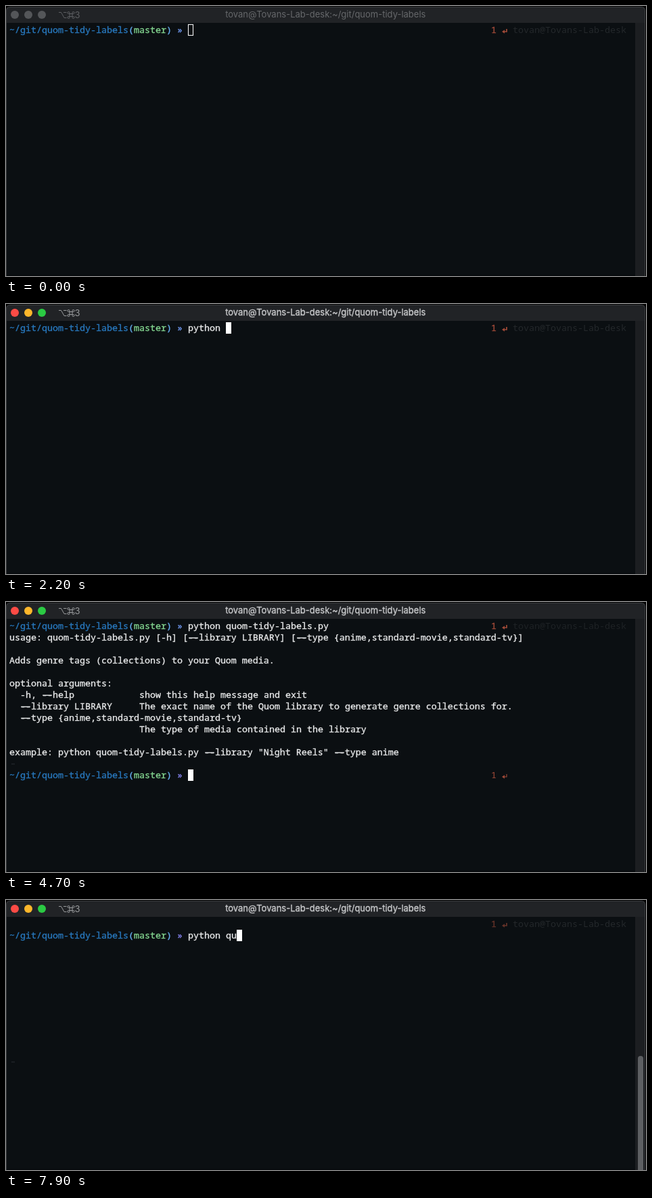
Recreate the animation shown at these times as an HTML page. Size 946x400 px, loop 8000 ms.

```html
<!DOCTYPE html>
<html lang="en">
<head>
<meta charset="utf-8">
<title>Terminal session</title>
<style>
  html, body { margin: 0; width: 100%; height: 100%; overflow: hidden; background: #000; }
  svg { display: block; width: 946px; height: 400px; }
  text { white-space: pre; }
  .mono { font: 400 13.3333px "Noto Sans Mono", "DejaVu Sans Mono", monospace; font-variant-ligatures: none; }
  .medium { stroke-width: 0.35px; }
  .ui { font: 400 13px Inter, "Open Sans", sans-serif; }
</style>
</head>
<body>
<svg id="stage" viewBox="0 0 946 400" xmlns="http://www.w3.org/2000/svg"></svg>
<script>
const LOOP = 8000, CELL = 8, LINE = 17, LEFT = 5;
const HOST = 'tovan@Tovans-Lab-desk', REPO = 'quom-tidy-labels', SCRIPT = REPO + '.py';
const WHITE = '#e8e9ea', DIM = '#24282b', RED = '#a04a38';
const PROMPT_COLS = 33;
const stage = document.getElementById('stage');

function add(parent, tag, attrs, content) {
  const el = document.createElementNS('http://www.w3.org/2000/svg', tag);
  for (const key in attrs) el.setAttribute(key, attrs[key]);
  if (content !== undefined) el.textContent = content;
  parent.appendChild(el);
  return el;
}
const group = (parent = stage) => add(parent, 'g', {});
const rect = (parent, x, y, width, height, fill, rx = 0) =>
  add(parent, 'rect', { x, y, width, height, fill, rx });
const colX = col => LEFT + col * CELL;
const write = (parent, col, row, content, fill = WHITE, medium = true) =>
  add(parent, 'text', {
    x: colX(col), y: 40 + row * LINE, fill,
    class: medium ? 'mono medium' : 'mono', stroke: medium ? fill : 'none'
  }, content);
const show = (el, on) => el.setAttribute('visibility', on ? 'visible' : 'hidden');

// Window
rect(stage, 0, 0, 946, 400, '#000');
add(stage, 'path', { d: 'M0 400V7Q0 1 6 1H939Q945 1 945 7V400Z', fill: '#3a3c3f' });
add(stage, 'path', { d: 'M1 25V7Q1 2 6.5 2H938.5Q944 2 944 7V25Z', fill: '#212326' });
rect(stage, 1, 25, 929, 375, '#0b0f12');
rect(stage, 930, 25, 14, 375, '#1c1e21');
rect(stage, 1, 398.5, 929, 1.5, '#070a0c');
const thumb = rect(stage, 934, 231, 8, 180, '#5d5f62', 4);

const lights = [13, 33, 53].map(cx => add(stage, 'circle', { cx, cy: 13, r: 6 }));
const badge = group();
add(badge, 'path', {
  d: 'M78 9.5H81.5L86 17.5H89.5M85 9.5H89.5' +
     'M94 11.5H98V15.5H94ZM94 11.5H92.5A1.5 1.5 0 1 1 94 10ZM98 11.5V10A1.5 1.5 0 1 1 99.5 11.5Z' +
     'M98 15.5H99.5A1.5 1.5 0 1 1 98 17ZM94 15.5V17A1.5 1.5 0 1 1 92.5 15.5Z',
  fill: 'none', stroke: 'currentColor', 'stroke-width': 1
});
add(badge, 'text', { x: 101.5, y: 17.5, class: 'ui', fill: 'currentColor' }, '3');
const title = add(stage, 'text', { x: 472.3, y: 17.3, class: 'ui medium', 'text-anchor': 'middle' });

// Terminal lines
function prompt(row) {
  const g = group();
  const parts = [[0, '~/git/' + REPO, '#2878bd'], [22, '(', '#66adf0'], [23, 'master', '#83d590'],
                 [29, ')', '#66adf0'], [31, '»', row ? '#8583ee' : '#6f97ee']];
  for (const [col, s, fill] of parts) write(g, col, row, s, fill);
  g.command = write(g, PROMPT_COLS, row, '');
  return g;
}
function exitMark(row) {
  const g = group(), y = row * LINE;
  write(g, 89, row, '1', RED, !row);
  add(g, 'path', {
    d: `M740 ${y + 34}V${y + 38}H735`, fill: 'none', stroke: RED, 'stroke-width': row ? 1.1 : 1.7
  });
  add(g, 'path', { d: `M733 ${y + 38}l4 -2.8v5.6Z`, fill: RED });
  return g;
}

// Plain output, with double hyphens joined into one bar
function writeJoined(parent, col, row, content) {
  write(parent, col, row, content);
  for (const { index } of content.matchAll(/--/g))
    rect(parent, colX(col + index) + 1.2, 35.5 + row * LINE, 13.6, 1.4, WHITE);
}

const first = prompt(0), second = prompt(13), third = prompt(1);
const firstMark = exitMark(0), secondMark = exitMark(13);
const host = write(stage, 93, 0, HOST, DIM, false);

const help = group();
[
  [0, 1, `usage: ${SCRIPT} [-h] [--library LIBRARY] [--type {anime,standard-movie,standard-tv}]`],
  [0, 3, 'Adds genre tags (collections) to your Quom media.'],
  [0, 5, 'optional arguments:'],
  [2, 6, '-h, --help'],
  [24, 6, 'show this help message and exit'],
  [2, 7, '--library LIBRARY'],
  [24, 7, 'The exact name of the Quom library to generate genre collections for.'],
  [2, 8, '--type {anime,standard-movie,standard-tv}'],
  [24, 9, 'The type of media contained in the library'],
  [0, 11, `example: python ${SCRIPT} --library "Night Reels" --type anime`]
].forEach(([col, row, s]) => writeJoined(help, col, row, s));
const dash = rect(stage, 8, 239.5, 5, 1, '#2b2f32');

const caret = add(stage, 'rect', {});
const arrow = add(stage, 'path', {
  d: 'M0 0V15.3L3.5 12 5.9 17.3 8.4 16.2 6.1 11H10.6Z', fill: '#050607', stroke: '#f4f4f4', 'stroke-width': 1.1
});
const beam = add(stage, 'path', {
  d: 'M284 103.5Q287 103.5 287 106V118Q287 120.5 284 120.5M290 103.5Q287 103.5 287 106M287 118Q287 120.5 290 120.5',
  fill: 'none', stroke: '#d8d9da', 'stroke-width': 1
});

// Typing: [time, characters shown]
const RUN = `python ${SCRIPT} `;
const runKeys = [[1800, 1], [1900, 2], [2000, 4], [2100, 6], [2200, 7], [2700, 8], [2800, 9], [2900, 11], [3100, 27]];
const clearKeys = [[6100, 1], [6200, 2], [6400, 4], [6500, 5]];
const againKeys = [[7400, 1], [7500, 3], [7600, 4], [7700, 6], [7800, 7], [7900, 9]];
const typed = (keys, t) => keys.reduce((n, [at, count]) => t >= at ? count : n, 0);

function placeCaret(col, row, solid) {
  const inset = solid ? 0 : 0.5;
  const box = {
    x: colX(col) + inset, y: 27 + row * LINE + inset, width: CELL - 2 * inset, height: LINE - 2 * inset,
    fill: solid ? '#fff' : 'none', stroke: solid ? 'none' : '#f2f2f2', 'stroke-width': 1.1
  };
  for (const key in box) caret.setAttribute(key, box[key]);
}

function draw(t) {
  const focused = t >= 1100, running = t >= 4300 && t < 4500;
  const output = t >= 4400 && t < 6900, ready = t >= 4500 && t < 6900, cleared = t >= 6900;
  const titleColor = focused ? '#c6c7c9' : '#66686b';

  ['#fc4b45', '#fdb72b', '#2bca43'].forEach((c, i) => lights[i].setAttribute('fill', focused ? c : '#545659'));
  badge.setAttribute('color', focused ? '#999b9d' : '#5d5f62');
  title.setAttribute('fill', titleColor);
  title.setAttribute('stroke', focused ? titleColor : 'none');
  title.textContent = running ? 'python ' + SCRIPT : `${HOST}:~/git/${REPO}`;

  show(first, !cleared);
  show(help, output);
  show(second, ready);
  show(secondMark, ready);
  show(third, cleared);
  show(thumb, cleared);
  show(dash, t >= 4500);
  firstMark.setAttribute('opacity', cleared ? 0.6 : 1);
  host.setAttribute('fill', output ? '#1e2225' : DIM);

  const run = typed(runKeys, t), clear = typed(clearKeys, t), again = typed(againKeys, t);
  first.command.textContent = RUN.slice(0, run);
  second.command.textContent = 'clear'.slice(0, clear);
  third.command.textContent = RUN.slice(0, again);

  if (cleared) placeCaret(PROMPT_COLS + again, 1, true);
  else if (ready) placeCaret(PROMPT_COLS + clear, 13, true);
  else if (running) placeCaret(0, output ? 12 : 1, true);
  else placeCaret(PROMPT_COLS + run, 0, focused);

  // The pointer glides up from the bottom edge, then becomes a text beam
  const left = Math.pow(1 - Math.min(1, Math.floor(t / 100) / 9), 2);
  arrow.setAttribute('transform', `translate(${286.5 + 60 * left} ${111.5 + 350 * left})`);
  show(arrow, t >= 100 && t < 1200);
  show(beam, t >= 1200 && t < 1800);
}

const start = performance.now();
function tick() {
  draw((performance.now() - start) % LOOP);
  requestAnimationFrame(tick);
}
draw(0);
requestAnimationFrame(tick);
</script>
</body>
</html>
```
